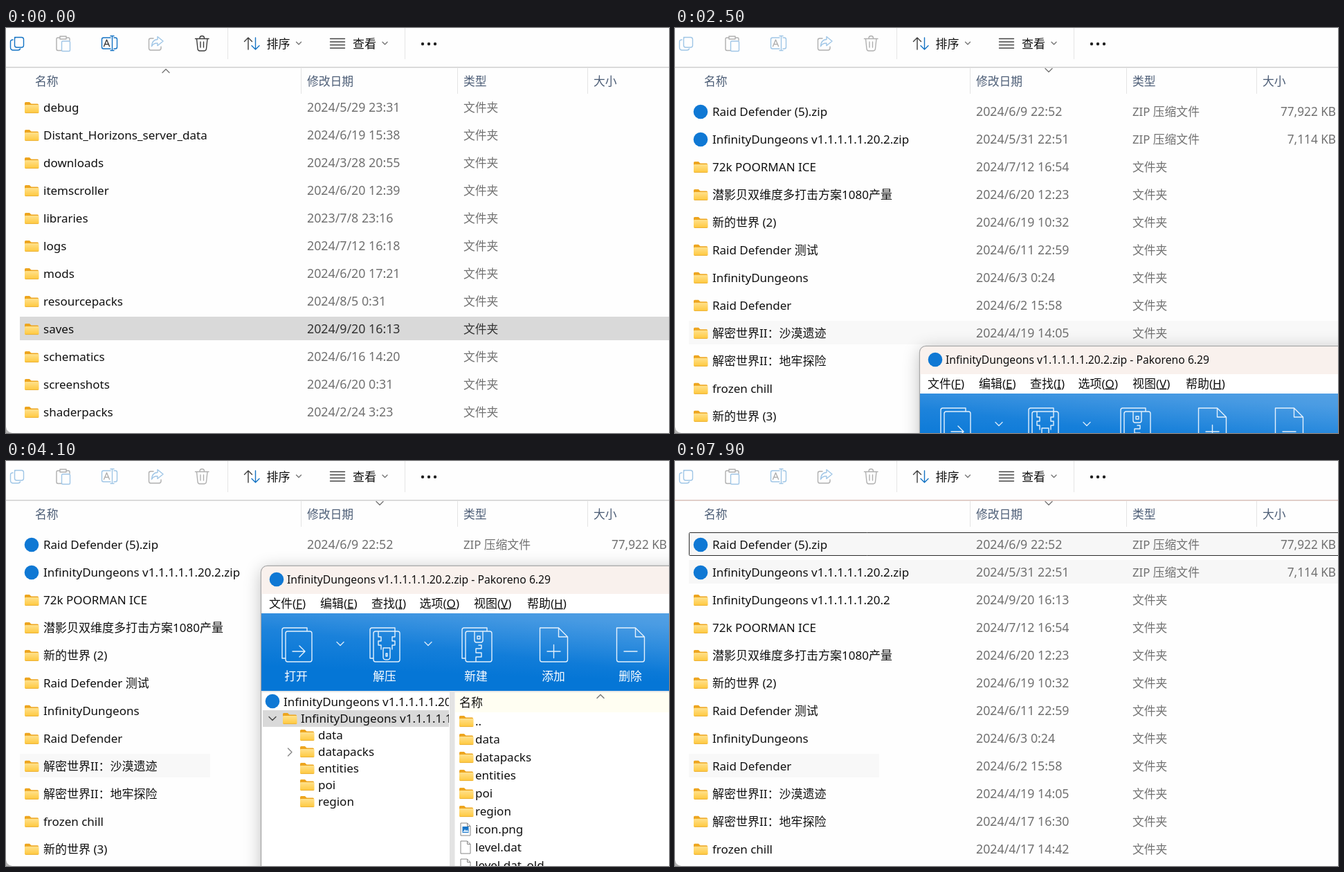
Animation of 958 by 585 pixels, one loop 8 s. Source, as an HTML page:

```html
<!DOCTYPE html>
<html lang="zh-CN">
<head>
<meta charset="utf-8">
<title>文件夹</title>
<style>
html, body { margin: 0; width: 100%; height: 100%; overflow: hidden; background: #fefefe; }
svg { display: block; width: 958px; height: 585px; }
text { font: 17px 'Noto Sans', 'Noto Sans CJK SC', 'Noto Sans CJK', sans-serif; fill: #101010; white-space: pre; }
.date { font-size: 17.8px; fill: #707070; }
.kind { font-size: 16.8px; fill: #707070; }
.size { font-size: 17.2px; fill: #707070; text-anchor: end; }
.selected .date, .selected .kind { fill: #333; }
.head { font-size: 16.8px; fill: #4c5d76; }
.title { font-size: 15.7px; }
.label { font-size: 16.8px; fill: #fff; text-anchor: middle; }
.line { fill: none; stroke-width: 1.4; stroke-linecap: round; stroke-linejoin: round; }
.off { opacity: .4; }
u, .key { text-decoration: underline; }

[class*="t-"] { animation: 8s step-end infinite; }
.t-first { animation-name: first; }
.t-inside { animation-name: inside; }
.t-old { animation-name: old; }
.t-new { animation-name: new; }
.t-dim { animation-name: dim; }
.t-rule { animation-name: rule; }
.t-window { animation-name: drag; }
.t-delete { animation-name: delete; }
.t-header { animation-name: header; }
.t-wide { animation-name: wide; }
.t-short { animation-name: short; }
.t-second { animation-name: second; }
.t-focus { animation-name: focus; }
.t-top { animation-name: top; }
.t-full { animation-name: full; }

@keyframes first { 0% { visibility: visible } 10%, 100% { visibility: hidden } }
@keyframes inside { 0% { visibility: hidden } 10%, 100% { visibility: visible } }
@keyframes old { 0% { visibility: hidden } 10% { visibility: visible } 81.25%, 100% { visibility: hidden } }
@keyframes new { 0% { visibility: hidden } 81.25%, 100% { visibility: visible } }
@keyframes dim { 0% { opacity: 1 } 10% { opacity: .75 } 11.25% { opacity: .55 } 12.5%, 100% { opacity: .4 } }
@keyframes rule { 0% { fill: #cfcfcf } 10% { fill: #d8bfb8 } 25% { fill: #cfcfcf } 75%, 100% { fill: #d8bfb8 } }
@keyframes drag {
  0% { visibility: hidden }
  31.25% { visibility: visible; transform: translate(-15px, 308px) }
  32.5% { visibility: visible; transform: translate(-14px, 288px) }
  33.75% { visibility: visible; transform: translate(-11px, 240px) }
  35% { visibility: visible; transform: translate(-8px, 175px) }
  36.25% { visibility: visible; transform: translate(-5px, 105px) }
  37.5% { visibility: visible; transform: translate(-2px, 46px) }
  38.75% { visibility: visible; transform: translate(-1px, 12px) }
  40% { visibility: visible; transform: none }
  72.5%, 100% { visibility: hidden }
}
@keyframes delete { 0% { opacity: 0 } 42.5% { opacity: 1 } 43.75%, 100% { opacity: 0 } }
@keyframes header { 0% { fill: #fff } 42.5% { fill: #dbebf8 } 45%, 100% { fill: #fffef2 } }
@keyframes wide { 0% { opacity: 0 } 10% { opacity: .4 } 11.25% { opacity: .7 } 12.5% { opacity: 1 } 40%, 100% { opacity: 0 } }
@keyframes short { 0% { opacity: 0 } 40%, 100% { opacity: 1 } }
@keyframes second { 0% { opacity: 0 } 60% { opacity: .25 } 61.25% { opacity: .5 } 62.5% { opacity: .75 } 63.75%, 100% { opacity: 1 } }
@keyframes focus { 0% { opacity: 0 } 72.5%, 100% { opacity: 1 } }
@keyframes top { 0% { opacity: 0 } 93.75% { opacity: .5 } 95%, 100% { opacity: 1 } }
@keyframes full { 0% { opacity: 0 } 98.75%, 100% { opacity: 1 } }
</style>
</head>
<body>
<script>
const text = (x, y, s, cls = '') => `<text x="${x}" y="${y}" class="${cls}">${s}</text>`;
const rect = (x, y, w, h, fill, cls = '') =>
  `<rect x="${x}" y="${y}" width="${w}" height="${h}" fill="${fill}" class="${cls}"/>`;
const line = (d, color, extra = '') => `<path class="line" d="${d}" stroke="${color}" ${extra}/>`;
const group = (cls, ...parts) => `<g class="${cls}">${parts.join('')}</g>`;
const folder = (x, y) => `<use href="#folder" x="${x}" y="${y - 8}"/>`;
const archive = (x, y) => `<circle cx="${x}" cy="${y}" r="10.3" fill="#0f78d4"/>`;
const chevron = (x, y, w, h, color) => line(`M${x - w} ${y - h / 2}l${w} ${h}l${w} ${-h}`, color, 'stroke-width="1.2"');
const KIND = '文件夹';

const row = (y, [name, date, size]) =>
  (size ? archive(37, y) : folder(27, y)) + text(54, y + 6, name) + text(435, y + 6, date, 'date') +
  text(661, y + 6, size ? 'ZIP 压缩文件' : KIND, 'kind') + (size ? text(955, y + 6, size, 'size') : '');
const list = (top, rows) => rows.slice(0, 12).map((r, i) => row(top + i * 39.97, r)).join('');

const gameRows = [
  ['debug', '2024/5/29 23:31'], ['Distant_Horizons_server_data', '2024/6/19 15:38'],
  ['downloads', '2024/3/28 20:55'], ['itemscroller', '2024/6/20 12:39'],
  ['libraries', '2023/7/8 23:16'], ['logs', '2024/7/12 16:18'],
  ['mods', '2024/6/20 17:21'], ['resourcepacks', '2024/8/5 0:31'],
  ['saves', '2024/9/20 16:13'], ['schematics', '2024/6/16 14:20'],
  ['screenshots', '2024/6/20 0:31'], ['shaderpacks', '2024/2/24 3:23']
];
const zips = [
  ['Raid Defender (5).zip', '2024/6/9 22:52', '77,922 KB'],
  ['InfinityDungeons v1.1.1.1.1.20.2.zip', '2024/5/31 22:51', '7,114 KB']
];
const worlds = [
  ['72k POORMAN ICE', '2024/7/12 16:54'], ['潜影贝双维度多打击方案1080产量', '2024/6/20 12:23'],
  ['新的世界 (2)', '2024/6/19 10:32'], ['Raid Defender 测试', '2024/6/11 22:59'],
  ['InfinityDungeons', '2024/6/3 0:24'], ['Raid Defender', '2024/6/2 15:58'],
  ['解密世界II：沙漠遗迹', '2024/4/19 14:05'], ['解密世界II：地牢探险', '2024/4/17 16:30'],
  ['frozen chill', '2024/4/17 14:42'], ['新的世界 (3)', '2024/4/5 20:48']
];
const extracted = ['InfinityDungeons v1.1.1.1.1.20.2', '2024/9/20 16:13'];

const BLUE = '#1473c4', DARK = '#3c3c3c';
const defs = `<defs>
  <linearGradient id="gold" x2="0" y2="1"><stop stop-color="#ffe18c"/><stop offset="1" stop-color="#ffc83d"/></linearGradient>
  <linearGradient id="blue" x1="0" y1="1" x2=".25" y2="0"><stop offset=".3" stop-color="#0576d6"/><stop offset="1" stop-color="#2a8ade"/></linearGradient>
  <linearGradient id="shine" x1=".3" y1="1" x2="1" y2="0"><stop offset=".4" stop-color="#fff" stop-opacity="0"/><stop offset="1" stop-color="#fff" stop-opacity=".22"/></linearGradient>
  <linearGradient id="navy" x2="0" y2="1"><stop stop-color="#1f66a4"/><stop offset="1" stop-color="#04569c"/></linearGradient>
  <filter id="soft" x="-20%" y="-20%" width="140%" height="140%"><feGaussianBlur stdDeviation="13"/></filter>
  <clipPath id="tree"><path d="M369 334H640V700H369z"/></clipPath>
  <g id="folder"><path d="M0 1.5Q0 0 1.5 0H7l2.5 2.5H18.5Q20 2.5 20 4V9H0z" fill="#eda51f"/>
    <rect y="4" width="20.5" height="12" rx="1.3" fill="url(#gold)"/><path d="M1 15.6H19.5" stroke="#e9ad32" stroke-width=".9"/></g>
  <g id="file"><path d="M.5.5H10l4.5 4.5V18.5H.5zM10 .5V5h4.5" fill="#fff" stroke="#858585"/></g>
</defs>`;

const toolbar = [
  group('t-dim',
    line('M12.5 13.5H22.5Q25.5 13.5 25.5 16.5V25Q25.5 28 22.5 28H15.5Q12.5 28 12.5 25V15.5Q12.5 13.5 14.5 13.5M10 17Q6.5 17 6.5 20V28Q6.5 32 10.5 32H17Q20 32 20.5 30', BLUE),
    line('M151 14H141Q138.500 14 138.500 16.500V27.500Q138.500 30 141 30H151M156 14H158Q160.500 14 160.500 16.500V27.500Q160.500 30 158 30H156M153.500 11.500V32.500M151 11.500H156M151 32.500H156', BLUE),
    line('M141.500 26.500L145.500 17L149.500 26.500M143 23.500H148', DARK),
    line('M273.500 15.500H293M275.500 15.500L277 30Q277.300 33 280 33H286.500Q289 33 289.500 30L291 15.500M280 15Q280 11.500 283.300 11.500Q286.500 11.500 286.500 15M281 20V28M285.500 20V28', DARK)),
  group('off',
    line('M78 14H75Q73 14 73 16V30Q73 32.500 75 32.500H80M88 14H90Q92 14 92 16V18M78 12H87V16H78z', DARK),
    line('M82 19H91Q92.500 19 92.500 20.500V32Q92.500 33.500 91 33.500H82Q80.500 33.500 80.500 32V20.500Q80.500 19 82 19z', BLUE),
    line('M213 15H209Q206.500 15 206.500 17.500V29Q206.500 32 209 32H221Q224 32 224 29V27', DARK),
    line('M219 12.500L227 19L219 25.500V22Q213 21.500 210.500 26.500Q211 17 219 16.500z', BLUE)),
  line('M350 31V14M344.500 19.500L350 14L355.500 19.500', DARK),
  line('M360.500 14V31M355 25.500L360.500 31L366 25.500', BLUE),
  text(376.5, 29, '排序'), chevron(423, 22, 3.5, 3.5, '#777'),
  line('M468.500 15.500H489.500M468.500 20H489.500M468.500 24.500H489.500M468.500 29H489.500', '#444'),
  text(501, 29, '查看'), chevron(547.5, 22, 3.5, 3.5, '#777'),
  [602, 611, 620].map(x => `<circle cx="${x}" cy="23" r="2.2" fill="#222"/>`).join(''),
  rect(320, 0, 1, 45, '#e6e6e6'), rect(576, 0, 1, 45, '#e6e6e6')
].join('');

const columns = rect(0, 56, 958, 1.5, '#cfcfcf', 't-rule') +
  [426, 652, 840].map(x => rect(x, 58, 1, 37, '#e4e4e4')).join('') +
  [[42, '名称'], [435, '修改日期'], [661, '类型'], [849, '大小']].map(([x, s]) => text(x, 83, s, 'head')).join('') +
  group('t-first', chevron(231, 62, 5, -5, '#777')) + group('t-inside', chevron(540, 61, 5, 5, '#777'));

const first = group('t-first', rect(20, 417, 938, 34, '#d9d9d9'),
  gameRows.map((r, i) => group(r[0] === 'saves' ? 'selected' : '', row(115 + i * 40, r))).join(''));

const hovers = rect(20, 423, 938, 34, '#f8f8f8', 't-wide') + rect(20, 423, 275, 34, '#f8f8f8', 't-short') +
  rect(20, 143, 312, 34, '#f8f8f8', 't-second') + rect(20, 143, 938, 34, '#f7f7f7', 't-full') +
  rect(20, 104, 938, 33, '#f7f7f7', 't-top') +
  group('t-focus', '<rect x="20.5" y="103.5" width="950" height="33" rx="1" fill="none" stroke="#2b2b2b"/>');

const menus = [[380, '文件', 'F'], [454, '编辑', 'E'], [528, '查找', 'I'], [597.5, '选项', 'O'], [676, '视图', 'V'], [753, '帮助', 'H']]
  .map(([x, s, key]) => text(x, 211.5, `${s}(<tspan class="key">${key}</tspan>)`)).join('');

const page = x => `M${x} 241H${x + 27}L${x + 40} 254V287Q${x + 40} 290 ${x + 37} 290H${x + 3}Q${x} 290 ${x} 287V241M${x + 27} 241V254H${x + 40}`;
const stack = x => `M${x} 285V244Q${x} 241 ${x + 3} 241H${x + 36}V246M${x} 285H${x + 5}` +
  `M${x + 8} 246H${x + 40}Q${x + 43} 246 ${x + 43} 249V287Q${x + 43} 290 ${x + 40} 290H${x + 8}Q${x + 5} 290 ${x + 5} 287V249Q${x + 5} 246 ${x + 8} 246z`;
const ribbon = rect(369, 220, 700, 112, 'url(#blue)') + rect(369, 220, 700, 112, 'url(#shine)') +
  rect(847, 220, 111, 112, 'url(#navy)', 't-delete') +
  line(stack(399) + 'M414 275H432M424 267L432 275L424 283' +
    stack(526) + 'M538 246V254H542V260H538V266H542V272M562 246V254H558V260H562V266H558V272M545 270H555V284Q555 287 550 287Q545 287 545 284zM549 278H551V282H549z' +
    stack(659) + 'M677 246V259Q677 262 680 262H686Q689 262 689 259V246M681 253H685V257H681zM683 266H687V271H679V277H687V283H679V290' +
    page(771.5) + 'M782 275H801M791.500 265.500V284.500' + page(882.5) + 'M893 275H912', '#e4f1fc') +
  chevron(483, 264, 5, 5, '#d5e8f8') + chevron(610, 264, 5, 5, '#d5e8f8') +
  [[419, '打开'], [547, '解压'], [679, '新建'], [791, '添加'], [902, '删除']].map(([x, s]) => text(x, 316.5, s, 'label')).join('');

const dirs = ['data', 'datapacks', 'entities', 'poi', 'region'];
const tree = `<g clip-path="url(#tree)">` + archive(385, 347) + text(401, 353.5, extracted[0]) +
  rect(371, 360, 270, 24, '#d9d9d9') + chevron(385, 372, 5, 5, '#444') + folder(400, 372) + text(426, 378, extracted[0]) +
  dirs.map((d, i) => folder(425, 396 + i * 24) + text(451, 402 + i * 24, d)).join('') +
  line('M407.500 415L413 420.500L407.500 426', '#888') + '</g>';
const pane = rect(649, 334, 320, 29, '#fff', 't-header') + chevron(859, 340, 5, -5, '#777') + text(655, 355, '名称', 'pane') +
  ['..', ...dirs].map((d, i) => folder(655, 376 + i * 26) + text(678, 382 + i * 26, d)).join('') +
  ['icon.png', 'level.dat', 'level.dat_old'].map((f, i) =>
    `<use href="#file" x="656.5" y="${522.5 + i * 26}"/>` + text(678, 538 + i * 26, f)).join('') +
  rect(659.5, 528, 9, 9, '#1976c8') + '<path d="M660 536l3-4 2 2 1.500-1.500 2 3.500z" fill="#cfe6fa"/>';

const archiveWindow = group('t-window',
  '<rect x="369" y="156" width="700" height="600" rx="9" opacity=".26" filter="url(#soft)"/>',
  '<rect x="368.5" y="151.500" width="700" height="600" rx="9" fill="#fff" stroke="#a9a9a9" stroke-width="1.400"/>',
  '<path d="M369.200 192V161Q369.200 152.200 378 152.200H1068V192z" fill="#f9f1ed"/>',
  archive(391, 171), text(406, 177, zips[1][0] + ' - Pakoreno 6.29', 'title'), menus, ribbon,
  rect(369, 332, 700, 2, '#e6e6e6'), rect(641, 334, 7.5, 420, '#e3e3e3'), tree, pane);

document.body.innerHTML = `<svg viewBox="0 0 958 585">${defs}` + rect(0, 0, 958, 585, '#fefefe') +
  toolbar + columns + first + hovers +
  group('t-old', list(121, [...zips, ...worlds])) + group('t-new', list(121, [...zips, extracted, ...worlds])) +
  '<path d="M0 576Q1 584 9 585H0z" fill="#b5b5b5"/>' + archiveWindow + '</svg>';
</script>
</body>
</html>
```
